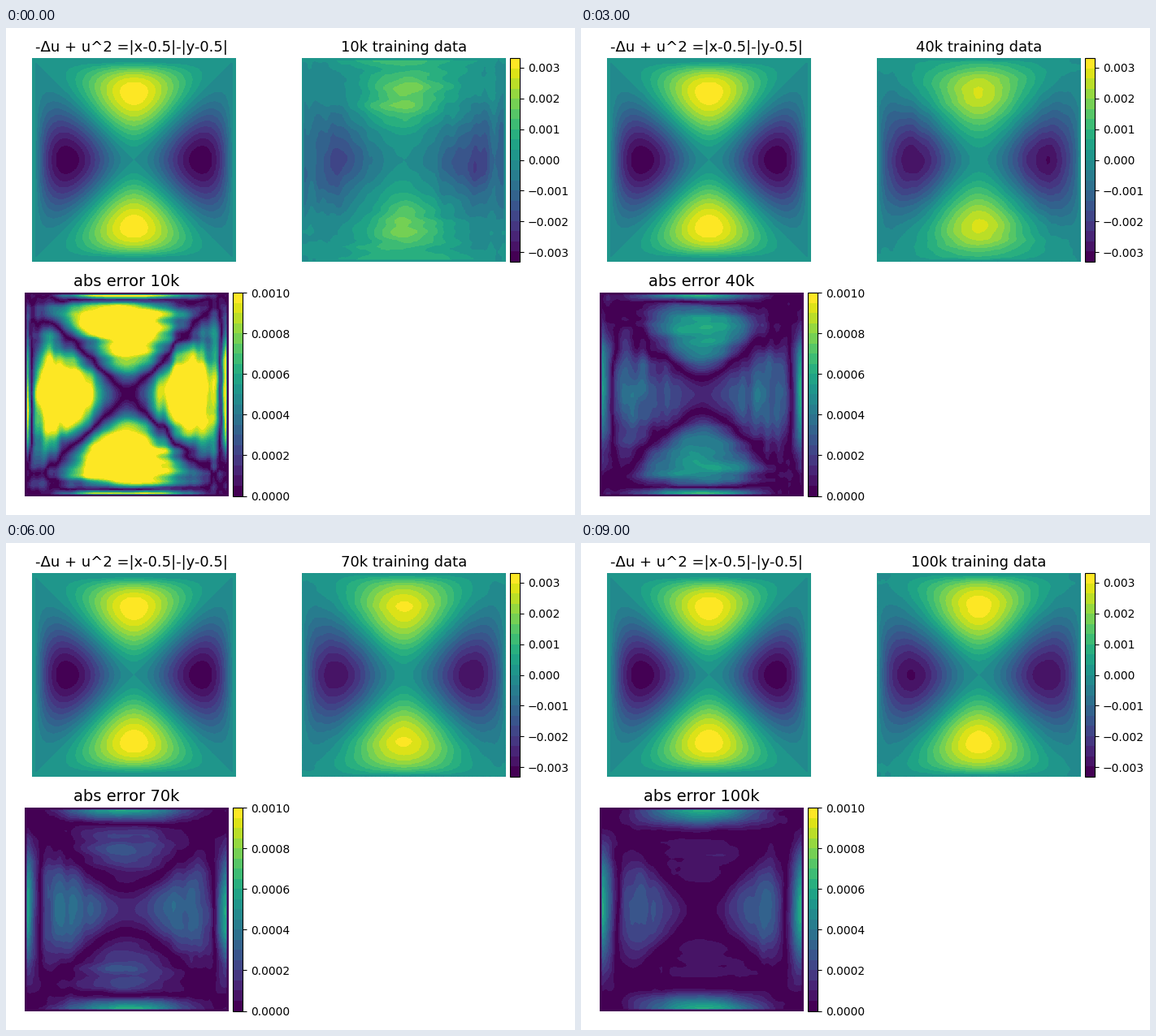
These frames come from a looping animation (700x600 px, 10 s). A matplotlib script:

```python
import numpy as np
import matplotlib.pyplot as plt
from matplotlib.animation import FuncAnimation

W, H, DPI = 700, 600, 100
N, STEPS = 101, 10
SIZE = 250.5
ULIM, ELIM = 0.0033, 0.001

plt.rcParams["font.family"] = "DejaVu Sans"
axis = np.linspace(0, 1, N)
X, Y = np.meshgrid(axis, axis)
DX, DY = X - 0.5, Y - 0.5


def clear_border(field):
    field[[0, -1], :] = 0
    field[:, [0, -1]] = 0
    return field


def solve():
    # u^2 is below 2e-5 here, so the linear sine-series solution is enough.
    # The domain sits one cell inside the plotted grid.
    inner = np.linspace(0, 1, N - 2)
    x, y = np.meshgrid(inner, inner)
    modes = np.arange(1, N - 3)
    sines = np.sin(np.pi * np.outer(inner, modes))
    f = np.abs(y - 0.5) - np.abs(x - 0.5)
    coef = (2 / (N - 3)) ** 2 * sines.T @ f @ sines
    coef /= np.pi ** 2 * (modes[:, None] ** 2 + modes[None, :] ** 2)
    side = (N - 3) / (N - 1)
    return np.pad(clear_border(side ** 3 * sines @ coef @ sines.T), 1)


def smooth_noise(rng, sx, sy):
    freq = np.fft.fftfreq(N)
    fx, fy = np.meshgrid(freq, freq)
    kernel = np.exp(-2 * np.pi ** 2 * ((sx * fx) ** 2 + (sy * fy) ** 2))
    field = np.fft.ifft2(np.fft.fft2(rng.standard_normal((N, N))) * kernel).real
    return field / field.std()


def streaks(seed):
    # Horizontal streaks above and below the centre, vertical ones beside it
    rng = np.random.default_rng(seed)
    r2 = DX ** 2 + DY ** 2
    upright = DY ** 2 / (r2 + 1e-3)
    rows = smooth_noise(rng, 10, 1.3)
    cols = smooth_noise(rng, 1.3, 10)
    spots = smooth_noise(rng, 3, 3)
    reach = np.clip(3 * np.sqrt(r2), 0, 1)
    return reach * (rows * upright + cols * (1 - upright) + 0.4 * spots)


def signed_error(step):
    # Lobes shrink with more data; amplitudes are in units of 1e-3
    gain = np.where(exact > 0, 1.4 * 0.74 ** step, 0.3 + 1.1 * 0.1 ** step)
    err = gain * np.tanh(350 * exact) / np.tanh(350 * exact.max())

    # Bands along the edges grow wider as the lobes fade
    width = 0.035 + 0.006 * step
    edge = 0.65 + 0.6 * 0.3 ** step

    def band(a):
        return np.exp(-(a / width) ** 2) + np.exp(-((1 - a) / width) ** 2)

    err += edge * (band(X) * np.sin(np.pi * Y) ** 2
                   - band(Y) * np.sin(np.pi * X) ** 2)

    dip = 0.16 * np.sin(np.pi * step / (STEPS - 1))
    err -= dip * np.exp(-(DX / 0.28) ** 2 - (DY / 0.16) ** 2)

    err += (0.11 * 0.65 ** step + 0.018) * streaks(step + 5)
    return clear_border(err * 1e-3)


exact = solve()
errors = [signed_error(step) for step in range(STEPS)]

fig = plt.figure(figsize=(W / DPI, H / DPI), dpi=DPI, facecolor="white")
cmap = plt.get_cmap("viridis", 20)


def add_axes(x, y, w, h):
    return fig.add_axes([x / W, 1 - (y + h) / H, w / W, h / H])


def panel(x, y, low, high, size, bar=True):
    ax = add_axes(x, y, SIZE, SIZE)
    image = ax.imshow(exact, cmap=cmap, vmin=low, vmax=high, aspect="auto")
    ax.axis("off")
    if bar:
        cax = add_axes(x + SIZE + 5, y, SIZE * 0.05, SIZE)
        fig.colorbar(image, cax=cax)
    return image, ax.set_title("", fontsize=size)


_, equation = panel(32.2, 37.28, -ULIM, ULIM, 13, bar=False)
equation.set_text("-Δu + u^2 =|x-0.5|-|y-0.5|")
equation.set_x(0.5 - 3.2 / SIZE)
guess, guess_title = panel(364.2, 37.28, -ULIM, ULIM, 13)
miss, miss_title = panel(23.2, 326.02, 0, ELIM, 14)


def update(step):
    count = f"{10 * (step + 1)}k"
    guess.set_data(exact - errors[step])
    miss.set_data(np.abs(errors[step]))
    guess_title.set_text(f"{count} training data")
    miss_title.set_text(f"abs error {count}")
    return guess, miss, guess_title, miss_title


update(0)
anim = FuncAnimation(fig, update, frames=STEPS, interval=1000, repeat=True,
                     repeat_delay=0, blit=False)
plt.show()
```
